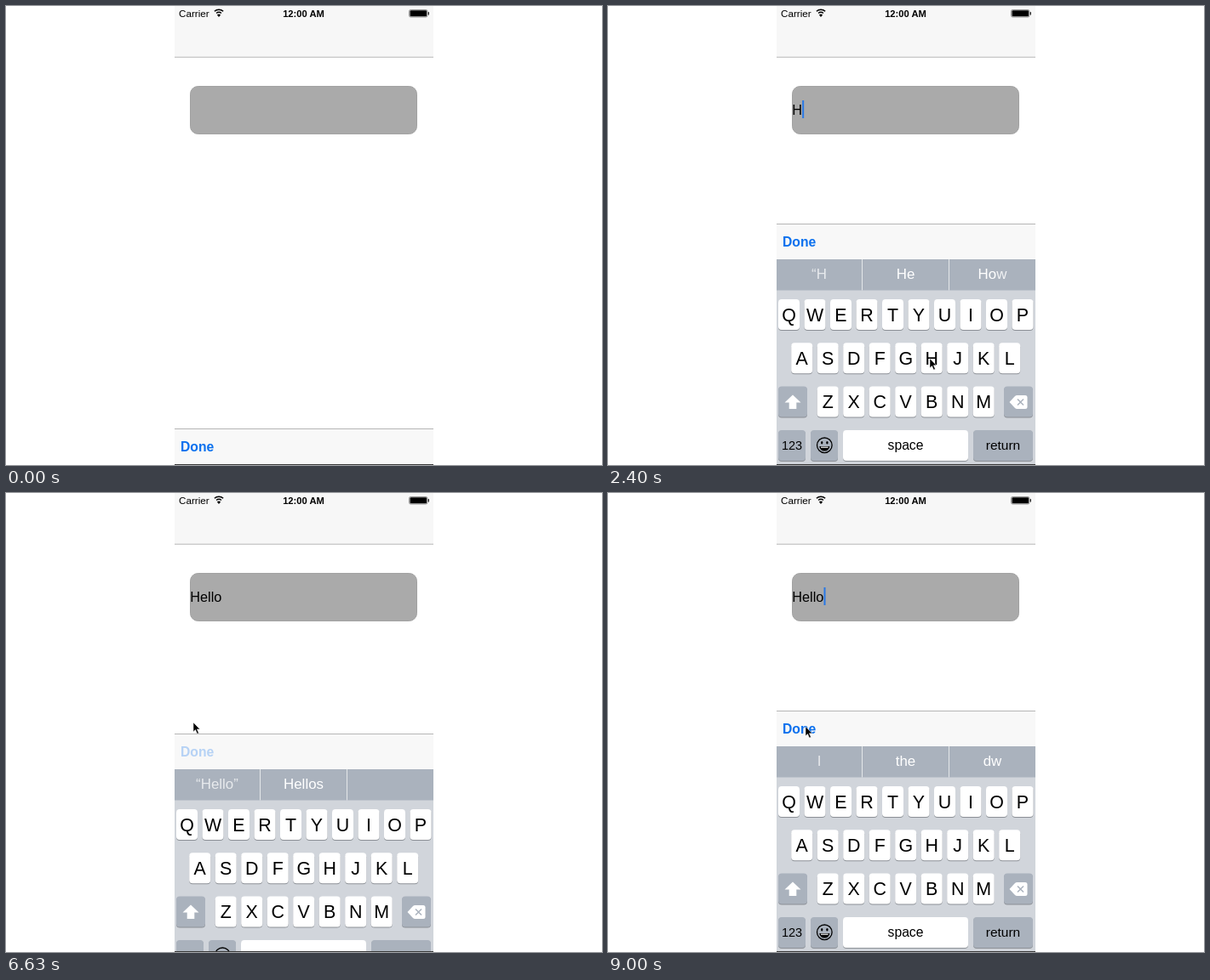
An HTML page for the animation above (9030 ms loop, 700 by 540 pixels).

```html
<!DOCTYPE html>
<html lang="en">
<head>
<meta charset="utf-8">
<title>Keyboard toolbar</title>
<style>
  html, body { margin: 0; width: 100%; height: 100%; overflow: hidden; background: #fff; }
  svg { display: block; width: 700px; height: 540px; }
  text { font-family: "Liberation Sans", Arial, sans-serif; white-space: pre; }
</style>
</head>
<body>
<svg id="stage" viewBox="0 0 700 540"></svg>
<script>
const LOOP = 9030, STEP = 30;
const SVG = "http://www.w3.org/2000/svg";
const stage = document.getElementById("stage");

function el(parent, tag, attrs = {}, content) {
  const node = document.createElementNS(SVG, tag);
  set(node, attrs);
  if (content !== undefined) node.textContent = content;
  parent.appendChild(node);
  return node;
}
function set(node, attrs) {
  for (const name in attrs) node.setAttribute(name, attrs[name]);
}
function rect(parent, x, y, width, height, fill, rx = 0) {
  return el(parent, "rect", { x, y, width, height, fill, rx });
}
function label(parent, x, y, size, content, attrs = {}) {
  return el(parent, "text", { x, y, "font-size": size, ...attrs }, content);
}
const centred = { "text-anchor": "middle" };
const clamp = v => Math.max(0, Math.min(1, v));

// Screen
rect(stage, 198, 0, 304, 60, "#f7f7f7");
rect(stage, 198, 59.7, 304, 1, "#b6b6b6");
label(stage, 203, 13, 11.7, "Carrier");
label(stage, 349.5, 13, 11.2, "12:00 AM", { ...centred, "font-weight": "bold" });
for (const r of [6, 3.4])
  el(stage, "path", {
    d: `M${250 - r * .85} ${11.4 - r * .85}A${r * 1.2} ${r * 1.2} 0 0 1 ${250 + r * .85} ${11.4 - r * .85}`,
    fill: "none", stroke: "#000", "stroke-width": 1.5
  });
el(stage, "path", { d: "M250 13l-2.1-2.4a3 3 0 0 1 4.2 0z" });
set(rect(stage, 473.5, 4.5, 21.5, 8.5, "none", 1.8), { stroke: "#777", "stroke-width": .8 });
rect(stage, 474.5, 5.3, 19.6, 6.9, "#000", 1);
rect(stage, 495.6, 7, 1.3, 3.5, "#222", .6);

set(rect(stage, 216.5, 94.5, 266, 56, "#aaa", 9), { stroke: "#a2a2a2", "stroke-width": 1 });
const typed = label(stage, 216.3, 127.6, 16.3, "");
const caret = rect(stage, 216.5, 111, 2, 21, "#2878e6");

// Toolbar and keyboard, drawn from the toolbar's top edge
const clip = el(el(stage, "defs"), "clipPath", { id: "screen" });
rect(clip, 198, 0, 304, 539, "#000");
const panel = el(el(stage, "g", { "clip-path": "url(#screen)" }), "g");
rect(panel, 198, 0, 304, 42, "#f8f8f8");
rect(panel, 198, 0, 304, 1, "#b6b6b6");
const done = label(panel, 205, 27, 15.7, "Done", { "font-weight": "bold" });
rect(panel, 198, 42, 304, 242, "#d1d5db");
rect(panel, 198, 42, 304, 36.5, "#aab2bd");
for (const x of [298, 400]) rect(panel, x, 42, 1, 36.5, "#e4e7ea");
const suggestions = [248, 349.5, 451.5].map(x => [0, 1].map(() =>
  label(panel, x, 64.6, 16.9, "", { ...centred, fill: "#fff" })));

const GREY = "#aab2bd";
const rowTop = row => 89 + row * 51.3;
function key(x, row, width, fill = "#fff") {
  rect(panel, x, rowTop(row) + 1, width, 36, "#8b8f95", 4);
  return rect(panel, x, rowTop(row), width, 36, fill, 4);
}
[["QWERTYUIOP", 200], ["ASDFGHJKL", 215.2], ["ZXCVBNM", 245.7]].forEach(([letters, left], row) => {
  [...letters].forEach((letter, i) => {
    const x = left + i * 30.5;
    key(x, row, 25);
    label(panel, x + 12.5, rowTop(row) + 25.6, 21.4, letter, centred);
  });
});
const shiftKey = key(200, 2, 34);
const shiftArrow = el(panel, "path", { d: "M217 201.500l9.500 9h-5.200v7.500h-8.600v-7.500h-5.200z" });
key(465, 2, 34, GREY);
el(panel, "path", {
  d: "M471.500 210l6.500-7q1-1 2.500-1h9.500q2.500 0 2.500 2.500v11q0 2.500-2.500 2.500h-9.500q-1.500 0-2.500-1z",
  fill: "#fff"
});
el(panel, "path", { d: "M481 206.500l7 7m0-7l-7 7", stroke: GREY, "stroke-width": 1.5 });
key(200, 3, 32, GREY);
label(panel, 216, 266, 14.5, "123", centred);
key(238, 3, 32, GREY);
el(panel, "circle", { cx: 254.3, cy: 260.8, r: 8.8, fill: "none", stroke: "#000", "stroke-width": 1.3 });
for (const cx of [251.2, 257.4])
  el(panel, "ellipse", { cx, cy: 257.7, rx: 1.2, ry: 1.8 });
el(panel, "path", { d: "M248.300 262h12a6 5.600 0 0 1-12 0z" });
el(panel, "path", { d: "M250 263.200h8.600", stroke: "#fff", "stroke-width": 1.2 });
key(276, 3, 147);
label(panel, 349.5, 265.5, 15.7, "space", centred);
key(429, 3, 70, GREY);
label(panel, 464, 265.5, 15.5, "return", centred);

rect(stage, 198, 539, 304, 1, "#3a3a3a");
const pointer = el(stage, "path", {
  d: "M0 .8v11l2.500-2.300 2 4.600 1.900-.8-2-4.500h3.400z",
  fill: "#000", stroke: "#fff", "stroke-width": .7, "stroke-opacity": .7
});

// Timeline
const OPEN = 644, CLOSE = 6599, REOPEN = 7966, PRESS = 6540;
const typing = [[2220, "H"], [3060, "He"], [3780, "Hel"], [4080, "Hell"], [4750, "Hello"]];
const hints = [
  [640, "I", "The", "Dw"],
  [2190, "“H", "He", "How"],
  [3060, "“He”", "Hey", "Hello"],
  [3780, "“Hel”", "Hello", "Help"],
  [4080, "“Hell”", "Hello", "Hells"],
  [4750, "“Hello”", "Hellos", ""],
  [7700, "“H", "he", "dw"],
  [8110, "I", "the", "dw"]
];
const track = [
  [30, 199, 240], [300, 276, 139], [1500, 276, 139], [2160, 378, 414], [2430, 378, 414],
  [2850, 272, 363], [3090, 272, 363], [3660, 470, 414], [4120, 470, 414], [4620, 456, 363],
  [4900, 456, 363], [5340, 425, 369], [5500, 425, 369], [6450, 220, 269], [7500, 220, 270],
  [7710, 277, 123], [8200, 277, 123], [8900, 232, 274]
];

// Critically damped spring from 0 to 1
function spring(elapsed) {
  const x = Math.max(0, elapsed) * .0183;
  return 1 - (1 + x) * Math.exp(-x);
}
function pointerAt(t) {
  const next = track.findIndex(stop => stop[0] > t);
  if (next < 0) return track[track.length - 1].slice(1);
  const [t0, x0, y0] = track[next - 1], [t1, x1, y1] = track[next];
  const p = (t - t0) / (t1 - t0), e = p * p * (3 - 2 * p);
  return [x0 + (x1 - x0) * e, y0 + (y1 - y0) * e];
}
function caretOpacity(t) {
  if (t < 600 || (t >= CLOSE && t < REOPEN)) return 0;
  const since = Math.max(...[600, REOPEN, ...typing.map(k => k[0])].filter(s => s <= t));
  if (t - since < 500) return 1;
  const phase = (t - since - 500) % 1000;
  return phase < 400 ? clamp(1 - phase / 250) : clamp((phase - 400) / 100);
}
// New words fade in letter by letter; old ones fade out whole
function drawHints(t) {
  const now = hints.filter(h => h[0] <= t).length - 1;
  const current = hints[now], previous = hints[now - 1];
  const lag = now === 0 ? 120 : 30, fade = now === 0 ? 260 : 180;
  suggestions.forEach(([fresh, old], cell) => {
    const base = cell ? 1 : .72;
    const elapsed = current ? t - current[0] : 0;
    const word = current ? current[cell + 1] : "";
    const same = previous && previous[cell + 1] === word;
    fresh.textContent = "";
    [...word].forEach((letter, i) => el(fresh, "tspan", {
      "fill-opacity": base * (same ? 1 : clamp((elapsed - lag * i) / fade))
    }, letter));
    old.textContent = previous && !same ? previous[cell + 1] : "";
    old.setAttribute("fill-opacity", base * clamp(1 - elapsed / 150));
  });
}

function draw(t) {
  const raised = spring(t - OPEN) - spring(t - CLOSE) + spring(t - REOPEN);
  panel.setAttribute("transform", `translate(0 ${Math.round(497 - 241 * raised)})`);

  const text = typing.reduce((word, [at, value]) => t >= at ? value : word, "");
  typed.textContent = text;
  const width = text ? typed.getComputedTextLength() : 0;
  set(caret, { x: 216.4 + width, opacity: caretOpacity(t) });

  const upper = t < typing[0][0];
  shiftKey.setAttribute("fill", upper ? "#fff" : GREY);
  shiftArrow.setAttribute("fill", upper ? "#000" : "#fff");

  const dim = t < PRESS ? 0 : 1 - clamp((t - 6660) / 240);
  set(done, { fill: "#0a70ee", "fill-opacity": 1 - .72 * dim });
  drawHints(t);

  const visible = t >= track[0][0];
  pointer.setAttribute("visibility", visible ? "visible" : "hidden");
  if (visible) pointer.setAttribute("transform", `translate(${pointerAt(t).join(" ")})`);
}

const start = performance.now();
function tick() {
  const t = (performance.now() - start) % LOOP;
  draw(Math.floor(t / STEP) * STEP);
  requestAnimationFrame(tick);
}
tick();
</script>
</body>
</html>
```
